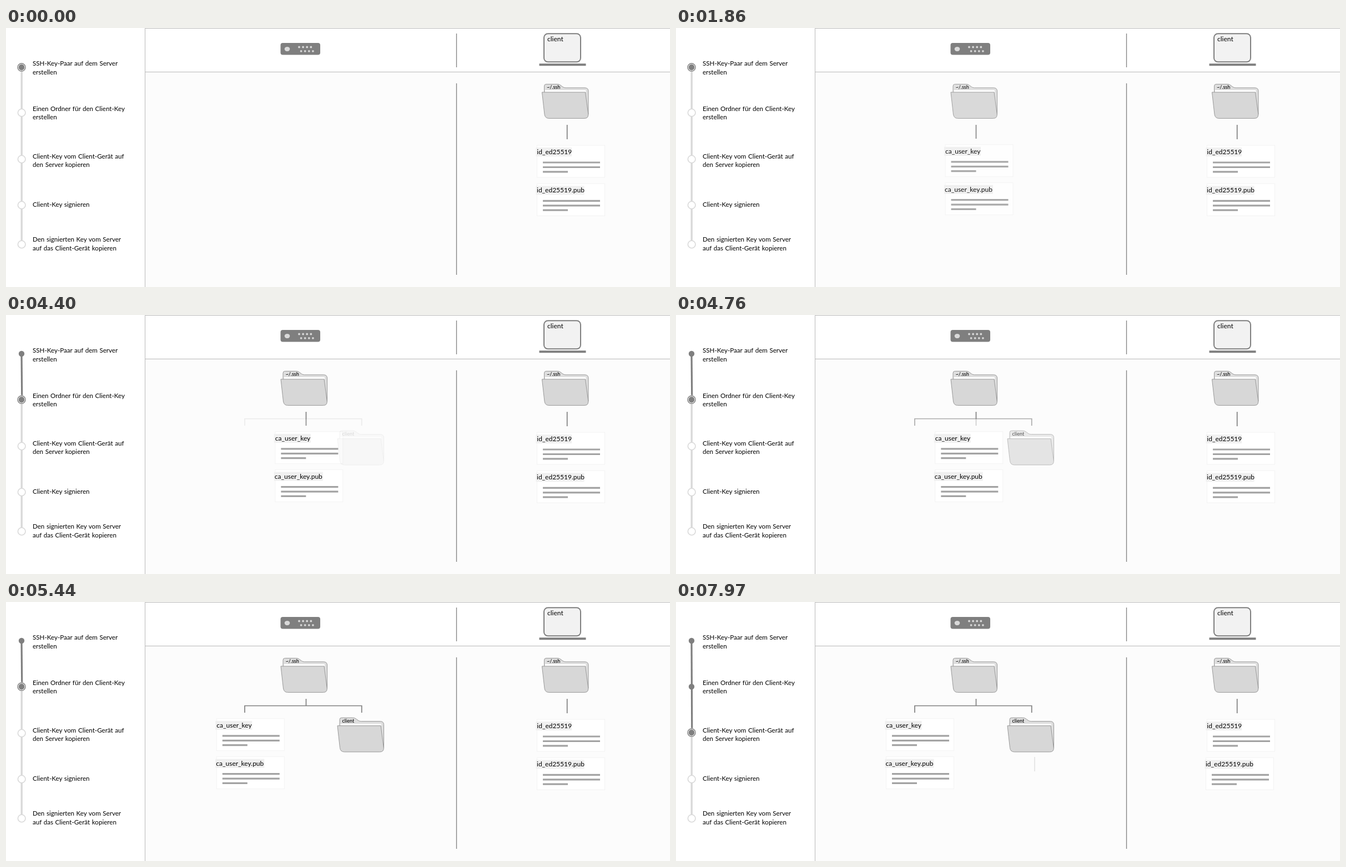
Write an HTML page that moves like this. It is 1196 px wide and 468 px high and loops after 8 s.

```html
<!DOCTYPE html>
<html lang="de">
<head>
<meta charset="utf-8">
<title>SSH-Key signieren</title>
<style>
  html, body { margin: 0; width: 100%; height: 100%; overflow: hidden; background: #fff; }
  svg { display: block; width: 1196px; height: 468px; }
  text { font: 12px Lato, "Open Sans", sans-serif; fill: #000; }
  .step { font-size: 11.6px; word-spacing: .6px; }
  .tab { font-size: 9px; font-weight: 500; }
  .dark { stroke: #7f7f7f; fill: none; }
  .thin { stroke-width: 1.7; }
</style>
</head>
<body>
<svg id="stage" viewBox="0 0 1196 468" xmlns="http://www.w3.org/2000/svg"></svg>
<script>
const LOOP = 8000;
const stage = document.getElementById("stage");

const line = (x1, y1, x2, y2, attrs) =>
  `<line x1="${x1}" y1="${y1}" x2="${x2}" y2="${y2}" ${attrs}/>`;
const text = (x, y, label, cls = "") =>
  `<text x="${x}" y="${y}" class="${cls}">${label}</text>`;
const group = (id, body) => `<g id="${id}">${body}</g>`;

// Coordinates are those of the folder on the client side
function folder(dx, dy, label) {
  return `<g transform="translate(${dx} ${dy})" stroke="#999" stroke-width="1">
    <path fill="#dedede" d="M969.5 125V105Q969.5 101.500 973 101.500H993Q996.500 101.500 999 103.500L1003 106.500Q1005 108 1008 108H1043Q1049 108.500 1049 114V156L1044 162Z"/>
    <path fill="#fff" stroke="none" d="M971 112.300H1044.500V116H971Z"/>
    <path fill="#d7d7d7" d="M965.500 116H1043.500L1048.800 156Q1049 163.300 1042 163.300H978Q971 163.300 970 156Z"/>
    <g stroke="none">${text(974, 110, label, "tab")}</g>
  </g>`;
}

function card(x, y, label, labelWidth, textX) {
  const rules = [[31, 113.5], [39.5, 113.5], [47.8, 55.5]].map(([dy, end]) =>
    line(x + 10.5, y + dy, x + end, y + dy, 'stroke="#a3a3a3" stroke-width="3.2"')).join("");
  return `<rect x="${x}" y="${y}" width="122" height="58" fill="#fff" stroke="#f3f3f3"/>
    <rect x="${x - 2}" y="${y + 4}" width="${labelWidth}" height="16" fill="#f0f0f0"/>
    ${text(textX, y + 16, label)}${rules}`;
}

function server() {
  let dots = "";
  for (let i = 0; i < 8; i++) {
    const row = i >> 2;
    dots += `<circle cx="${528 + (i % 4) * 7.1 + row * 3.6}" cy="${34.5 + row * 7.3}" r="1.9"/>`;
  }
  return `<rect x="494.500" y="27" width="71.500" height="21.500" rx="4" fill="#7f7f7f"/>
    <g fill="#d9d9d9"><ellipse cx="506.500" cy="38" rx="4.800" ry="4.100"/>${dots}</g>`;
}

const laptop = `<rect x="969" y="10.300" width="66" height="51" rx="7" fill="#f2f2f2" stroke="#7f7f7f" stroke-width="2"/>
  ${text(975, 23.5, "client")}<rect x="960.500" y="64.300" width="84" height="4" fill="#7f7f7f"/>`;

const steps = [
  [68, "SSH-Key-Paar auf dem Server", "erstellen"],
  [149.7, "Einen Ordner für den Client-Key", "erstellen"],
  [235.5, "Client-Key vom Client-Gerät auf", "den Server kopieren"],
  [322.5, "Client-Key signieren", ""],
  [386.3, "Den signierten Key vom Server", "auf das Client-Gerät kopieren"]
].map(([y, a, b]) => text(48, y, a, "step") + text(48, y + 15.6, b, "step")).join("");

const openDots = [153, 237, 320, 391].map((y, i) =>
  `<circle id="open${i}" cx="28.200" cy="${y}" r="6.800" fill="#fff" stroke="#d9d9d9" stroke-width="1.600"/>`).join("");
const doneDots = [70, 153].map((y, i) =>
  `<circle id="done${i}" cx="28" cy="${y}" r="5.200" fill="#7f7f7f"/>`).join("");

stage.innerHTML = `
  <rect width="1196" height="468" fill="#fff"/>
  <rect x="250" y="80" width="946" height="388" fill="#fcfcfc"/>
  <path d="M1196 .500H250.500V468M250.500 79.500H1196" fill="none" stroke="#b9b9b9"/>
  ${line(811.5, 10, 811.5, 71, 'class="dark" stroke-width="1.3"')}
  ${line(811.5, 100, 811.5, 446, 'class="dark" stroke-width="1.3"')}
  ${server()}${laptop}${steps}
  ${line(28.2, 71, 28.2, 391, 'id="track" stroke="#d9d9d9" stroke-width="3.4"')}
  ${openDots}
  ${line(28, 70, 28, 70, 'id="path" class="dark" stroke-width="3.2"')}
  ${doneDots}
  ${group("ring", `<circle cx="28" r="8.300" fill="#fff"/>
    <circle cx="28" r="7" class="dark" stroke-width="1.400"/><circle cx="28" r="5.400" fill="#7f7f7f"/>`)}
  ${folder(0, 0, "~/.ssh")}
  ${line(1010.7, 175, 1010.7, 201, 'class="dark thin"')}
  ${card(956.5, 212, "id_ed25519", 64.5, 956.3)}
  ${group("pub", card(956.5, 281.3, "id_ed25519.pub", 87, 956))}
  ${group("serverFiles", folder(-470.5, 0, "~/.ssh")
    + line(540.5, 175, 540.5, 188, 'class="dark thin"')
    + line(540.5, 188, 540.5, 200, 'id="stem" class="dark thin"')
    + group("keys", card(485, 210.8, "ca_user_key", 66, 485)
      + card(485, 279.6, "ca_user_key.pub", 88, 484)))}
  ${group("branch", '<path class="dark thin" d="M430 200V187.500H640.700V200"/>' + folder(-368.5, 107.6, "client"))}
  ${line(646, 280, 646, 306, 'id="clientStem" class="dark thin"')}`;

const el = id => document.getElementById(id);
const set = (id, attrs) => {
  for (const name in attrs) el(id).setAttribute(name, attrs[name]);
};
const ramp = (t, start, length) => Math.min(1, Math.max(0, (t - start) / length));
const ease = u => u < .5 ? 4 * u ** 3 : 1 - 4 * (1 - u) ** 3;
const glide = (t, start, length) => ease(ramp(t, start, length));

function draw(t) {
  const first = glide(t, 3180, 900);
  const second = glide(t, 6670, 900);
  const ringY = (t < 3200 ? 71 : 70) + 83 * first + 83 * second;

  set("ring", { transform: `translate(0 ${ringY})` });
  set("track", { y1: ringY });
  set("path", { x2: 28 + .8 * first, y2: ringY });
  set("done0", { opacity: t < 3200 ? 0 : 1 });
  set("done1", { opacity: t < 6690 ? 0 : 1 });
  set("open0", { opacity: t < 6690 ? 1 : 0 });
  set("open1", { cy: t < 6690 - 800 ? 237 : 235.7 });

  const branch = ramp(t, 4310, 700);
  set("serverFiles", { opacity: ramp(t, 1368, 530) });
  set("branch", { opacity: branch });
  set("stem", { opacity: 1 - branch });
  set("keys", { transform: `translate(${-106.5 * glide(t, 4310, 1290)} 0)` });

  set("clientStem", { opacity: ramp(t, 7828, 700) });
  set("pub", { transform: `translate(${-369 * glide(t, 7828, 1290)} 0)` });
}

const begin = performance.now();
function tick() {
  draw((performance.now() - begin) % LOOP);
  requestAnimationFrame(tick);
}
tick();
</script>
</body>
</html>
```
